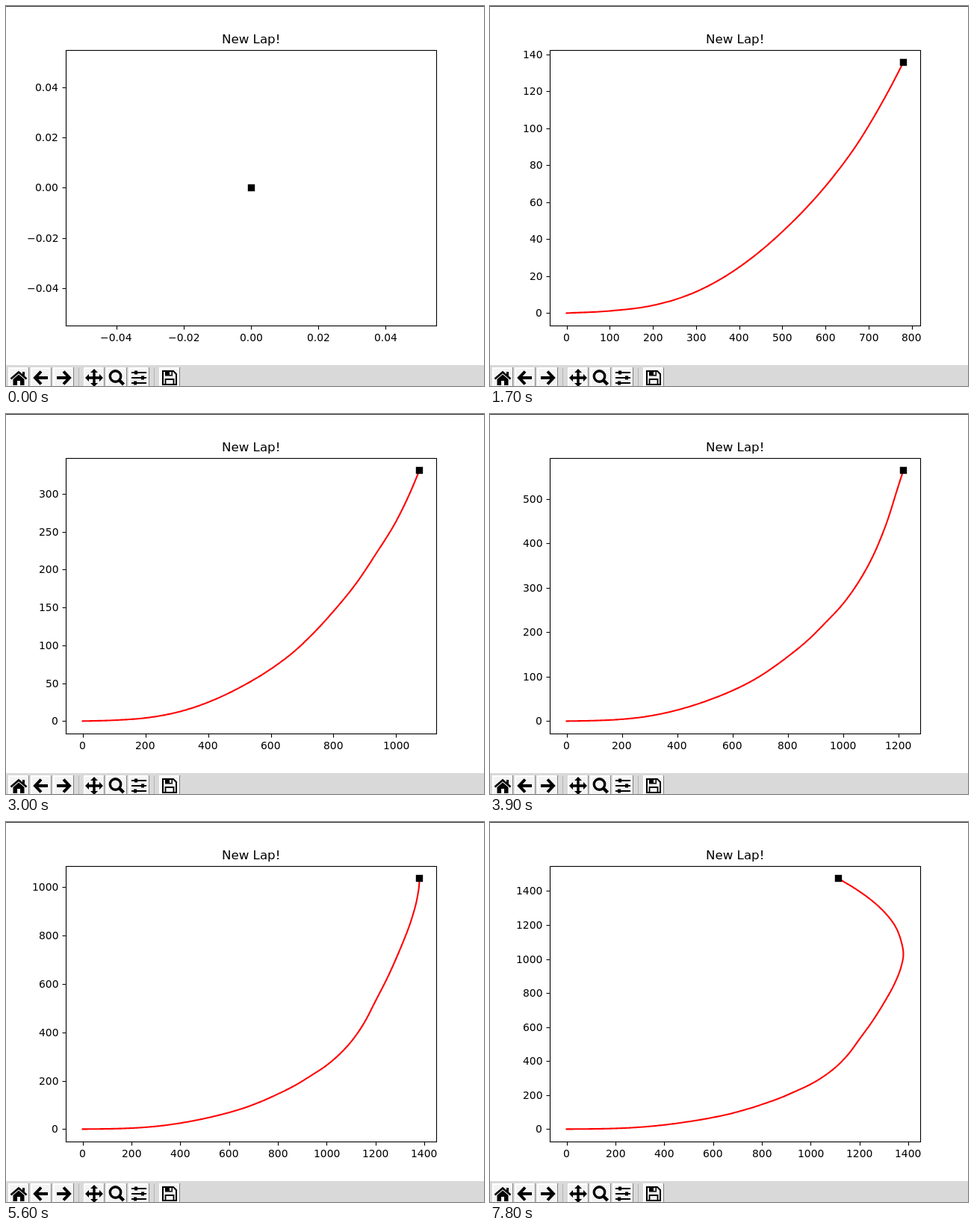
Write an HTML page with a canvas that moves like this. It is 640 by 509 pixels and loops after 8000 ms.

```html
<!DOCTYPE html>
<html>
<head>
<meta charset="utf-8">
<title>New Lap!</title>
<style>
  html, body { margin: 0; height: 100%; overflow: hidden; background: #fff; }
  canvas { display: block; }
</style>
</head>
<body>
<canvas id="stage" width="640" height="509"></canvas>
<script>
const ctx = document.getElementById('stage').getContext('2d');
const LOOP = 8000;
const FONT = '"DejaVu Sans", sans-serif';
const AXES = { left: 80, top: 57.6, width: 496, height: 369.6 };

// Points on the track, in data units.
const TRACK = [
  [0, 0], [100, 1.2], [200, 4.2], [254, 7.5], [334, 15.4], [419, 28.1],
  [501, 44.3], [617, 73.6], [672, 91], [723, 110.6], [800, 145], [877, 184.5],
  [933, 219.3], [1000, 264], [1050, 307], [1100, 361], [1150, 433],
  [1200, 529], [1250, 628], [1299, 739], [1348, 868], [1370, 950],
  [1380, 1030], [1371, 1105], [1346, 1195], [1305, 1272], [1250, 1345],
  [1186, 1411], [1112, 1475]
];

// Start time in ms and the height the car has reached.
const STEPS = [
  [0, 0], [1200, 73.6], [1400, 100], [1700, 135.8], [2000, 174.5],
  [2300, 219.3], [2900, 287.7], [3000, 331], [3300, 389], [3500, 469],
  [3900, 564], [4200, 634], [4400, 707], [4900, 874], [5300, 984],
  [5500, 1011], [5600, 1037], [6000, 1110], [6100, 1178], [6500, 1226],
  [6600, 1272], [7400, 1398], [7800, 1475]
];

const path = smooth(TRACK, 16);

// Cubic Hermite curve with tangents weighted by chord length.
function smooth(pts, n) {
  const chord = pts.slice(1).map((p, i) => Math.hypot(p[0] - pts[i][0], p[1] - pts[i][1]));
  const slope = (i, k) => (pts[i + 1][k] - pts[i][k]) / chord[i];
  const tangent = (i, k) => {
    if (i === 0) return slope(0, k);
    if (i === pts.length - 1) return slope(i - 1, k);
    const a = chord[i - 1], b = chord[i];
    return (b * slope(i - 1, k) + a * slope(i, k)) / (a + b);
  };
  const out = [pts[0]];
  for (let i = 0; i < chord.length; i++) {
    for (let j = 1; j <= n; j++) {
      const t = j / n, r = 1 - t;
      out.push([0, 1].map(k =>
        pts[i][k] * r * r * (1 + 2 * t) + pts[i + 1][k] * t * t * (3 - 2 * t) +
        chord[i] * t * r * (r * tangent(i, k) - t * tangent(i + 1, k))));
    }
  }
  return out;
}

// The part of the track driven so far; its height always grows.
function driven(y) {
  const n = path.findIndex(p => p[1] >= y);
  if (n <= 0) return n ? path : [path[0]];
  const [a, b] = [path[n - 1], path[n]];
  const f = (y - a[1]) / (b[1] - a[1]);
  return [...path.slice(0, n), [a[0] + f * (b[0] - a[0]), y]];
}

function limits(max) {
  return max ? [-0.05 * max, 1.05 * max] : [-0.055, 0.055];
}

function ticks([lo, hi]) {
  const raw = (hi - lo) / 9;
  const unit = 10 ** Math.floor(Math.log10(raw));
  const step = unit * [1, 2, 2.5, 5, 10].find(s => s * unit >= raw);
  const list = [];
  for (let i = Math.ceil(lo / step); i <= Math.floor(hi / step); i++) {
    const label = (i * step).toFixed(step < 1 ? 2 : 0).replace('-', '\u2212');
    list.push({ value: i * step, label });
  }
  return list;
}

function text(str, x, y, align, size) {
  ctx.font = `${size}px ${FONT}`;
  ctx.fillText(str, Math.round(x - align * ctx.measureText(str).width), y);
}

function line(x1, y1, x2, y2) {
  ctx.beginPath();
  ctx.moveTo(x1, y1);
  ctx.lineTo(x2, y2);
  ctx.stroke();
}

function drawPlot(y) {
  const pts = driven(y);
  const xLim = limits(Math.max(...pts.map(p => p[0])));
  const yLim = limits(y);
  const px = v => AXES.left + AXES.width * (v - xLim[0]) / (xLim[1] - xLim[0]);
  const py = v => AXES.top + AXES.height * (yLim[1] - v) / (yLim[1] - yLim[0]);

  ctx.save();
  ctx.translate(0, 1);
  ctx.strokeStyle = '#f00';
  ctx.lineWidth = 2.08;
  ctx.lineJoin = 'round';
  ctx.lineCap = 'square';
  if (pts.length > 1) {
    ctx.beginPath();
    pts.forEach(p => ctx.lineTo(px(p[0]), py(p[1])));
    ctx.stroke();
  }

  const head = pts[pts.length - 1];
  ctx.fillStyle = ctx.strokeStyle = '#000';
  ctx.fillRect(Math.round(px(head[0])) - 4.2, Math.round(py(head[1])) - 4.2, 9.4, 9.4);

  ctx.lineWidth = 1.11;
  ctx.lineCap = 'butt';
  ctx.lineJoin = 'miter';
  ctx.strokeRect(80.5, 58.5, 496, 369);
  for (const { value, label } of ticks(xLim)) {
    const x = px(value), snap = Math.round(x) + 0.5;
    line(snap, 427.5, snap, 432.5);
    text(label, x, 448, 0.5, 13.89);
  }
  for (const { value, label } of ticks(yLim)) {
    const at = py(value), snap = Math.round(at) + 0.5;
    line(75.5, snap, 80.5, snap);
    text(label, 70.28, Math.round(at + 5), 1, 13.89);
  }
  text('New Lap!', 328, 49, 0.5, 16.67);
  ctx.restore();
}

function shape(d, width) {
  const p = new Path2D(d);
  if (!width) return ctx.fill(p, 'evenodd');
  ctx.lineWidth = width;
  ctx.stroke(p);
}

// Each icon is a list of [path, stroke width]; width 0 means filled.
const ARROW = [['M-9 0H8', 4], ['M0 -8.5L8 0L0 8.5', 4]];
const ICONS = [
  [17, [['M-10.5 1.5L0 -7.5L10.5 1.5', 2.6], ['M5 -8H8V-1L5 -4Z', 0],
        ['M-7.5 2L0 -4.5L7.5 2V10H2V4H-2V10H-7.5Z', 0]]],
  [47, ARROW, -1],
  [77, ARROW],
  [118, [['M-9 0H9M0 -9V9', 3.4],
         ['M-12 0L-7 -5V5ZM12 0L7 -5V5ZM0 -12L-5 -7H5ZM0 12L-5 7H5Z', 0]]],
  [148, [['M5.7 -2A7.2 7.2 0 1 1 -8.7 -2A7.2 7.2 0 1 1 5.7 -2Z', 3.4], ['M3.5 3L9.5 9', 4.4]]],
  [178, [['M-10 -7H10M-10 0H10M-10 7H10', 2],
         ['M-6 -9.5H-2V-4.5H-6ZM3 -2.5H7V2.5H3ZM-7 4.5H-3V9.5H-7Z', 0]]],
  [219, [['M-9 -9H5L9 -5V9H-9Z', 2], ['M-5.5 9V2H5.5V9', 1.8],
         ['M-6 -9H4V-2.5H-6ZM0 -8V-4H2.5V-8Z', 0]]]
];

function drawToolbar() {
  ctx.fillStyle = '#d9d9d9';
  ctx.fillRect(0, 481, 640, 28);
  ctx.fillStyle = '#b4b4b4';
  ctx.fillRect(97, 485, 1, 24);
  ctx.fillRect(198, 485, 1, 24);
  for (const [x, parts, flip = 1] of ICONS) {
    ctx.save();
    ctx.translate(x, 498);
    ctx.fillStyle = '#828282';
    ctx.fillRect(-14, -14, 28, 28);
    ctx.fillStyle = '#fff';
    ctx.fillRect(-14, -14, 27, 28);
    ctx.fillStyle = '#f4f4f4';
    ctx.fillRect(-12, -12, 25, 26);
    ctx.scale(flip, 1);
    ctx.fillStyle = ctx.strokeStyle = '#000';
    parts.forEach(([d, width]) => shape(d, width));
    ctx.restore();
  }
}

function draw(now) {
  const t = now % LOOP;
  const step = STEPS.filter(s => s[0] <= t).pop();
  ctx.fillStyle = '#fff';
  ctx.fillRect(0, 0, 640, 509);
  ctx.fillStyle = '#333';
  ctx.fillRect(0, 0, 640, 1);
  drawPlot(step[1]);
  drawToolbar();
}

let start;
function frame(now) {
  start ??= now;
  draw(Math.max(0, now - start));
  requestAnimationFrame(frame);
}
draw(0);
requestAnimationFrame(frame);
</script>
</body>
</html>
```
